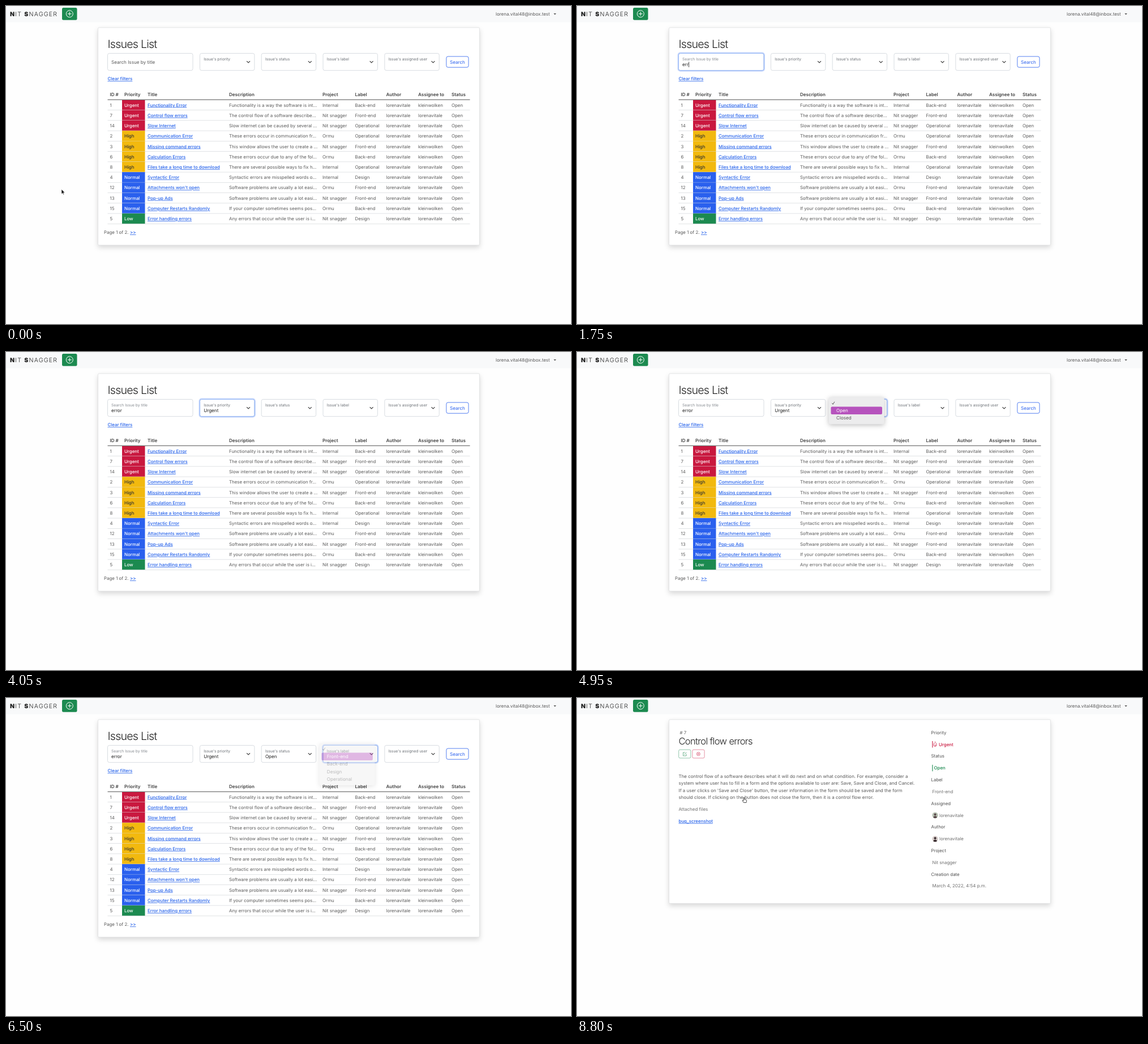
Recreate the animation shown at these times as an HTML page. Size 998x561 px, loop 9.55 s.

```html
<!DOCTYPE html>
<html lang="en">
<head>
<meta charset="utf-8">
<title>Issues</title>
<style>
html, body { margin: 0; width: 100%; height: 100%; overflow: hidden; background: #fefefe; }
svg { display: block; width: 100%; height: 100%; }
text { font-family: Inter, "Liberation Sans", sans-serif; text-rendering: geometricPrecision; white-space: pre; }
.thin { font-weight: 300; fill: #222; }
.title { letter-spacing: -.04em; }
.link { fill: #2360ea; font-weight: 500; text-decoration: underline; }
.card { fill: #fff; stroke: #dcdddf; filter: drop-shadow(0 4.2px 4.2px rgba(0,0,0,.15)); }
.popup { fill: #ececed; filter: drop-shadow(0 2px 4px rgba(0,0,0,.25)); }
</style>
</head>
<body>
<svg id="stage" viewBox="0 0 998 561"></svg>
<script>
const LOOP = 9550, STEP = 50;
const SUBMIT = 7900, DETAIL = 8800;
const BODY = 7.9, PROSE = 7.98, FIELD = 8.12, SMALL = 6.72;
const GREY = '#5a5a5a', SOFT = '#707070', DARK = '#3f3f3f', INK = '#222';
const RED = '#c9183f', GREEN = '#1c8a50', BLUE = '#2a60ee';
const stage = document.getElementById('stage');

function el(parent, tag, attrs = {}) {
  const node = document.createElementNS('http://www.w3.org/2000/svg', tag);
  for (const k in attrs) node.setAttribute(k, attrs[k]);
  return parent.appendChild(node);
}
const group = (parent, attrs) => el(parent, 'g', attrs);
const rect = (p, x, y, width, height, attrs) => el(p, 'rect', { x, y, width, height, ...attrs });
const path = (p, d, attrs) => el(p, 'path', { d, fill: 'none', 'stroke-linecap': 'round', 'stroke-linejoin': 'round', ...attrs });
// y is the middle of the line
function label(p, x, y, text, attrs = {}) {
  const size = attrs['font-size'] || BODY;
  const node = el(p, 'text', { x, y: y + size * .36, 'font-size': size, fill: GREY, ...attrs });
  node.textContent = text;
  return node;
}
const show = (node, on) => node.setAttribute('visibility', on ? 'visible' : 'hidden');
const fade = (node, o) => node.setAttribute('opacity', o);
const clamp = v => Math.max(0, Math.min(1, v));
const ramp = (t, from, length) => clamp((t - from) / length);

// ---- issue table ----
const me = 'lorenavitale', other = 'kleinwolken', site = 'Nit snagger', client = 'Ormu';
const tones = { Urgent: [RED, '#fff'], High: ['#f2b90f', '#333'], Normal: [BLUE, '#fff'], Low: [GREEN, '#fff'] };
const columns = [183.5, 209, 250, 394, 559, 616.5, 671.5, 728, 787];
const heads = ['ID #', 'Priority', 'Title', 'Description', 'Project', 'Label', 'Author', 'Assignee to', 'Status'];
const issues = [
  [1, 'Urgent', 'Functionality Error', 'Functionality is a way the software is int...', 'Internal', 'Back-end', other],
  [7, 'Urgent', 'Control flow errors', 'The control flow of a software describe...', site, 'Front-end', me],
  [14, 'Urgent', 'Slow Internet', 'Slow internet can be caused by several ...', site, 'Operational', me],
  [2, 'High', 'Communication Error', 'These errors occur in communication fr...', client, 'Operational', me],
  [3, 'High', 'Missing command errors', 'This window allows the user to create a ...', site, 'Front-end', other],
  [6, 'High', 'Calculation Errors', 'These errors occur due to any of the fol...', client, 'Back-end', other],
  [8, 'High', 'Files take a long time to download', 'There are several possible ways to fix h...', 'Internal', 'Operational', me],
  [4, 'Normal', 'Syntactic Error', 'Syntactic errors are misspelled words o...', 'Internal', 'Design', me],
  [12, 'Normal', "Attachments won't open", 'Software problems are usually a lot easi...', client, 'Front-end', me],
  [13, 'Normal', 'Pop-up Ads', 'Software problems are usually a lot easi...', site, 'Front-end', me],
  [15, 'Normal', 'Computer Restarts Randomly', 'If your computer sometimes seems pos...', client, 'Back-end', other],
  [5, 'Low', 'Error handling errors', 'Any errors that occur while the user is i...', site, 'Design', me]
];

function card(p, bottom) {
  rect(p, 162.5, 38, 674, bottom - 38, { rx: 2, class: 'card', 'stroke-width': .8 });
}

function issueList(rows, pageText, more) {
  const g = group(stage), rowH = 18.24, end = 165.4 + rows.length * rowH;
  card(g, end + 37.6);
  heads.forEach((h, i) => label(g, columns[i], 156, h, { 'font-size': 8.05, 'font-weight': 600, fill: DARK }));
  rows.forEach((row, i) => {
    const top = 165.4 + i * rowH, mid = top + 9.3;
    const [tone, ink] = tones[row[1]];
    rect(g, 205, top, 40.5, rowH, { fill: tone });
    rect(g, 179.5, top + rowH - .4, 640, .8, { fill: '#d9dcdf' });
    [...row.slice(0, 6), me, row[6], 'Open'].forEach((text, c) => label(g, columns[c], mid, text,
      c === 1 ? { fill: ink, 'font-weight': 500 } : c === 2 ? { class: 'link' } : {}));
  });
  rect(g, 179.5, 164.8, 640, 1.2, { fill: '#707070' });
  label(g, 173, end + 15, pageText);
  if (more) label(g, 219, end + 15, '>>', { class: 'link' });
  return g;
}

// ---- header ----
rect(stage, 0, 0, 998, 28.5, { fill: '#f8f9fa' });
const brand = el(stage, 'text', { x: 7, y: 18, 'font-size': 10.6, 'letter-spacing': 1.15, class: 'thin' });
for (const [text, weight] of [['N', 900], ['IT ', 300], ['S', 900], ['NAGGER', 300]])
  el(brand, 'tspan', { 'font-weight': weight }).textContent = text;
rect(stage, 99, 3, 26.5, 21.8, { rx: 2.5, fill: GREEN });
el(stage, 'circle', { cx: 112.3, cy: 13.8, r: 6, fill: 'none', stroke: '#fff', 'stroke-width': 1 });
path(stage, 'M109.3 13.8h6M112.3 10.8v6', { stroke: '#fff', 'stroke-width': 1 });
label(stage, 865, 14, 'lorena.vital48@inbox.test', { 'font-size': PROSE });
path(stage, 'M967.3 12.9h4.6l-2.3 2.5z', { fill: '#555' });

const fullList = issueList(issues, 'Page 1 of 2.', true);
const foundList = issueList([issues[1]], 'Page 1 of 1.', false);

// ---- filter form ----
const form = group(stage);
label(form, 179.5, 66.8, 'Issues List', { 'font-size': 19.6, class: 'thin title' });
label(form, 179.5, 128.5, 'Clear filters', { class: 'link' });

function field(x, width, from, to) {
  rect(form, x, 83.5, width, 30.2, { rx: 3, fill: '#fff', stroke: '#ced4da', 'stroke-width': .8 });
  const ring = group(form);
  rect(ring, x - 1, 82.5, width + 2, 32.2, { rx: 4, fill: 'none', stroke: '#2f6cf5', 'stroke-opacity': .25, 'stroke-width': 2.2 });
  rect(ring, x, 83.5, width, 30.2, { rx: 3, fill: 'none', stroke: '#86aef9', 'stroke-width': .8 });
  return t => fade(ring, from == null || t >= SUBMIT ? 0 : ramp(t, from, 150) * (1 - ramp(t, to, 150)));
}

const FOCUS = 900;
const searchRing = field(179.5, 150.5, FOCUS, 2250);
const hint = label(form, 0, 0, 'Search Issue by title', { 'font-size': FIELD });
const typed = label(form, 186, 103, '', { 'font-size': FIELD, fill: INK });
const caret = rect(form, 186, 98.5, .8, 9.5, { fill: INK });
const keys = [1350, 1550, 1700, 1850, 2000];

function drawSearch(t) {
  const up = ramp(t, FOCUS, 100);
  hint.setAttribute('transform', `translate(186 ${98.6 - 5.5 * up}) scale(${1 - up * (1 - SMALL / FIELD)})`);
  hint.setAttribute('fill', up ? '#858a90' : GREY);
  typed.textContent = 'error'.slice(0, keys.filter(k => t >= k).length);
  caret.setAttribute('x', 186.3 + (typed.textContent ? typed.getComputedTextLength() : 0));
  show(caret, t >= FOCUS && t < 2250);
  searchRing(t);
}

// focus, blur: ring; open, pick, enter: popup list
const FADE = 170;
const selects = [
  { x: 342.5, name: "Issue's priority", options: ['Urgent', 'High', 'Normal', 'Low'], focus: 2250, blur: 4250, open: 2550, pick: 2850, enter: 3250 },
  { x: 451.2, name: "Issue's status", options: ['Open', 'Closed'], focus: 4250, blur: 5350, open: 4500, pick: 4750, enter: 5000 },
  { x: 560, name: "Issue's label", options: ['Front-end', 'Back-end', 'Design', 'Operational'], focus: 5350, blur: 7700, open: 5850, pick: 6150, enter: 6400 },
  { x: 668.8, name: "Issue's assigned user", options: [] }
];
for (const s of selects) {
  s.ring = field(s.x, 96.4, s.focus, s.blur);
  label(form, s.x + 6.7, 93.1, s.name, { 'font-size': SMALL, fill: '#686d73' });
  path(form, `M${s.x + 83} 97.5l2.6 2.6 2.6-2.6`, { stroke: '#444', 'stroke-width': 1.1 });
  if (s.focus) s.value = label(form, s.x + 6.7, 103, s.options[0], { 'font-size': FIELD, fill: INK });
}

function searchButton(p, fill, ink) {
  rect(p, 777.8, 89, 39.2, 19.2, { rx: 3, fill, stroke: BLUE, 'stroke-width': .8 });
  label(p, 784, 98.7, 'Search', { fill: ink, 'font-size': FIELD });
}
searchButton(form, '#fff', BLUE);
const pressed = group(form);
searchButton(pressed, BLUE, '#fff');

const ITEM = 13.4;
for (const s of selects.filter(s => s.focus)) {
  const g = s.popup = group(form), x = s.x - 6.5;
  rect(g, x, 79.5, 98, ITEM * (s.options.length + 1) + 7.5, { rx: 3.5, class: 'popup' });
  s.mark = rect(g, x + 3.8, 0, 90.5, ITEM, { rx: 2, fill: '#b653bd' });
  path(g, `M${x + 6} 90.5l1.4 1.8 2.6-4.2`, { stroke: '#444', 'stroke-width': .9 });
  s.items = s.options.map((o, i) => label(g, x + 13.3, 103 + i * ITEM, o, { 'font-size': FIELD }));
}

function drawSelect(s, t) {
  s.ring(t);
  if (!s.focus) return;
  const picked = t >= s.pick;
  show(s.popup, t >= s.open && t < s.enter + FADE);
  fade(s.popup, 1 - ramp(t, s.enter, FADE));
  s.mark.setAttribute('y', picked ? 96.5 : 96.5 - ITEM);
  s.items[0].setAttribute('fill', picked ? '#fff' : '#444');
  fade(s.value, t >= s.enter + 150 ? 1 : 0);
}

// ---- issue page ----
const detail = group(stage);
card(detail, 362.5);
label(detail, 181.5, 61, '# 7');
label(detail, 179.5, 76.5, 'Control flow errors', { 'font-size': 16.5, class: 'thin title' });
[[179.7, GREEN], [203.9, RED]].forEach(([x, stroke]) =>
  rect(detail, x, 91.2, 21.2, 14.8, { rx: 2.2, fill: '#fff', stroke, 'stroke-width': .6, 'stroke-opacity': .8 }));
path(detail, 'M190.5 96h-3v6h5.6v-3M189.7 99.8l3.6-3.9', { stroke: GREEN, 'stroke-width': .6 });
el(detail, 'circle', { cx: 214.4, cy: 98.7, r: 3, fill: 'none', stroke: RED, 'stroke-width': .6 });
path(detail, 'M213.2 97.5l2.4 2.4m0-2.4l-2.4 2.4', { stroke: RED, 'stroke-width': .7 });
[
  'The control flow of a software describes what it will do next and on what condition. For example, consider a',
  'system where user has to fill in a form and the options available to user are: Save, Save and Close, and Cancel.',
  "If a user clicks on 'Save and Close' button, the user information in the form should be saved and the form",
  'should close. If clicking on the button does not close the form, then it is a control flow error.'
].forEach((line, i) => label(detail, 179.5, 138 + i * 12.5, line, { 'font-size': PROSE }));
label(detail, 179.5, 196.3, 'Attached files', { 'font-size': PROSE, fill: SOFT });
label(detail, 179.5, 217, 'bug_screenshot', { class: 'link' });

['Priority', 'Status', 'Label', 'Assigned', 'Author', 'Project', 'Creation date'].forEach((h, i) =>
  label(detail, 625.5, 61 + i * 41.63, h, { fill: '#4f4f4f' }));
rect(detail, 627.4, 76, 1.1, 11.5, { fill: RED });
path(detail, 'M632.4 77c.3 2 2.8 3 2.8 5.6a2.6 2.6 0 0 1-5.2 0c0-1.6 1-2 1.2-3.4M632.5 82c1.2 1 1.2 2.3 0 2.9', { stroke: RED, 'stroke-width': .8 });
label(detail, 639, 81.7, 'Urgent', { fill: RED, 'font-weight': 500 });
rect(detail, 627.4, 117.8, 1.1, 11.5, { fill: GREEN });
label(detail, 630.5, 123.4, 'Open', { fill: GREEN, 'font-weight': 500 });
label(detail, 627.5, 165, 'Front-end', { fill: SOFT });
[[206.8, '#b9c2b4', '#5a4a4c'], [248.5, '#d9cfcc', '#3a2d30']].forEach(([y, back, tone]) => {
  el(detail, 'circle', { cx: 632.6, cy: y, r: 5.2, fill: back });
  el(detail, 'circle', { cx: 632.6, cy: y - 1.2, r: 2, fill: tone });
  path(detail, `M629.2 ${y + 3.9}a3.5 3.5 0 0 1 6.8 0a5.2 5.2 0 0 1-6.8 0z`, { fill: tone });
  label(detail, 640, y, me, { fill: SOFT });
});
label(detail, 627.5, 290, site, { fill: SOFT });
label(detail, 627.5, 331.6, 'March 4, 2022, 4:54 p.m.', { 'font-size': PROSE, fill: SOFT });

// ---- pointer ----
const pointer = group(stage);
const shapes = {
  arrow: path(pointer, 'M0 0v8.2l1.9-1.8 1.3 2.9 1.3-.6-1.3-2.8h2.6z', { fill: '#111', stroke: '#fff', 'stroke-width': .6 }),
  beam: path(pointer, 'M-1.6-4.5q1.6 0 1.6 1v7q0 1-1.6 1M1.6-4.5q-1.6 0-1.6 1M0 3.5q0 1 1.6 1', { stroke: INK, 'stroke-width': .8 }),
  hand: path(pointer, 'M-.8 5.5v-5a.8.8 0 0 1 1.6 0v3l3 .7q1 .3.8 1.5l-.6 3.3h-4.6l-2.2-3.2q-.4-1.2.6-1z', { fill: '#fff', stroke: INK, 'stroke-width': .8 })
};
const smooth = u => u * u * (3 - 2 * u), speedUp = u => u * u, slowDown = u => u * (2 - u);
const route = [
  [0, 98, 323.5], [200, 98, 323.5], [850, 232, 100, smooth], [7150, 232, 100],
  [7600, 795, 100, smooth], [7700, 795, 100], [7800, 760, 117.5, speedUp], [8350, 295, 175.5, slowDown], [LOOP, 295, 175.5]
];

function drawPointer(t) {
  const i = route.findIndex(p => p[0] > t), a = route[i - 1], b = route[i];
  const u = (b[3] || (v => v))((t - a[0]) / (b[0] - a[0]));
  const x = a[1] + (b[1] - a[1]) * u, y = a[2] + (b[2] - a[2]) * u;
  pointer.setAttribute('transform', `translate(${x} ${y})`);
  const over = (l, top, r, bottom) => x > l && x < r && y > top && y < bottom;
  const kind = over(179, 83, 330, 114) ? 'beam'
    : over(777, 89, 817, 108) || (t >= SUBMIT && over(250, 168, 320, 182)) ? 'hand' : 'arrow';
  const visible = t < 1300 || t >= 7150;
  for (const k in shapes) show(shapes[k], visible && k === kind);
}

function draw(t) {
  show(fullList, t < SUBMIT);
  show(foundList, t >= SUBMIT && t < DETAIL);
  form.setAttribute('display', t < DETAIL ? 'inline' : 'none');
  show(detail, t >= DETAIL);
  drawSearch(t);
  for (const s of selects) drawSelect(s, t);
  fade(pressed, t >= SUBMIT ? 0 : ramp(t, 7500, 150));
  drawPointer(t);
}

const start = performance.now();
function tick() {
  const t = (performance.now() - start) % LOOP;
  draw(Math.floor(t / STEP) * STEP);
  requestAnimationFrame(tick);
}
tick();
</script>
</body>
</html>
```
